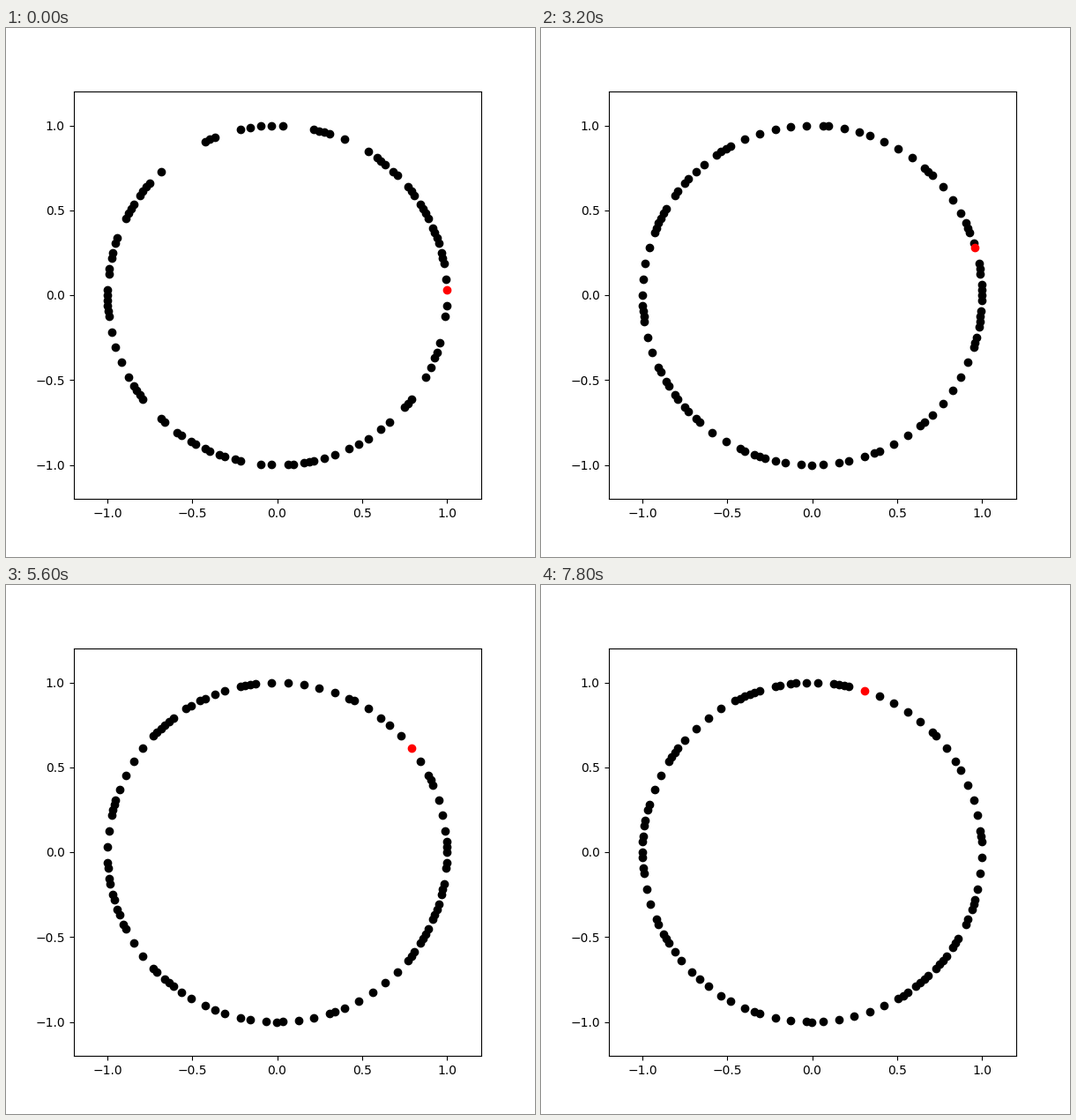
A matplotlib script for the animation above (8000 ms loop, 600 by 600 pixels).

```python
import numpy as np
import matplotlib.pyplot as plt
from matplotlib.animation import FuncAnimation

CELLS = 200      # sites on the ring road
VMAX = 2         # cells per step
STEPS = 40
TRACER_CELL = 1

# Starting platoons: first cell, last cell, cars spread evenly between them.
PLATOONS = [
    (6, 22, 14), (25, 30, 5), (32, 37, 2), (40, 43, 4), (49, 57, 5),
    (62, 64, 3), (74, 77, 2), (78, 85, 7), (89, 96, 6), (99, 104, 6),
    (107, 116, 4), (118, 121, 4), (126, 127, 2), (130, 143, 10),
    (147, 149, 2), (152, 157, 5), (159, 173, 7), (177, 179, 3),
    (184, 191, 5), (196, 203, 4),
]


def place_cars():
    spread = np.concatenate([np.linspace(*p) for p in PLATOONS])
    return np.floor(spread + 0.5).astype(int) % CELLS


def advance(cars):
    """Every car moves as far as its gap and the speed limit allow."""
    gap = (np.roll(cars, -1) - cars - 1) % CELLS
    return (cars + np.minimum(gap, VMAX)) % CELLS


history = [place_cars()]
for _ in range(STEPS - 1):
    history.append(advance(history[-1]))
is_tracer = history[0] == TRACER_CELL

fig, ax = plt.subplots(figsize=(6, 6), dpi=100)
ax.set_aspect("equal")
ax.set(xlim=(-1.2, 1.2), ylim=(-1.2, 1.2))
ticks = np.linspace(-1, 1, 5)
ax.set_xticks(ticks)
ax.set_yticks(ticks)

traffic, = ax.plot([], [], "o", color="black")
tracer, = ax.plot([], [], "o", color="red")


def draw(step):
    angle = 2 * np.pi * history[step] / CELLS
    x, y = np.cos(angle), np.sin(angle)
    traffic.set_data(x[~is_tracer], y[~is_tracer])
    tracer.set_data(x[is_tracer], y[is_tracer])
    return traffic, tracer


def reset():
    return draw(0)


anim = FuncAnimation(fig, draw, frames=STEPS, init_func=reset,
                     interval=200, repeat=True, repeat_delay=0)
plt.show()
```
